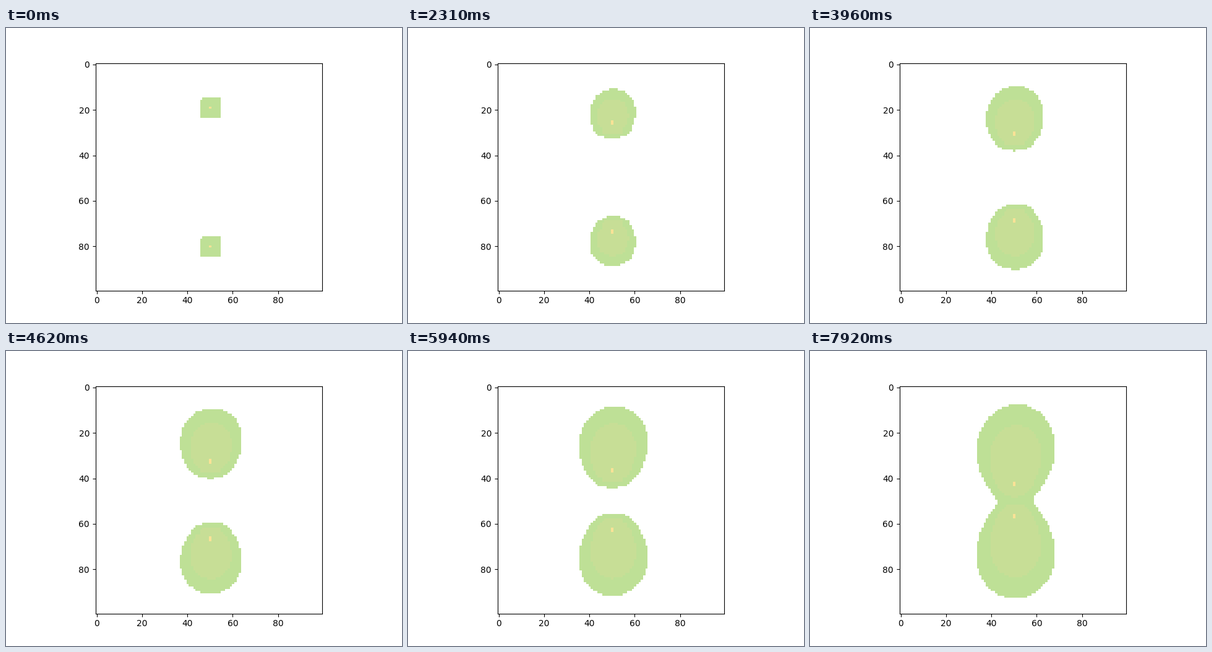
A matplotlib script that plays this animation: 640 px wide and 476 px high, repeating every 8000 ms.

```python
import numpy as np
import matplotlib.pyplot as plt
from matplotlib.animation import FuncAnimation

SIZE = 100
STEPS = 25
STEP_MS = 330
LOOP_MS = 8000
TICK_MS = 40

SPREAD = 0.7                      # share of each cell that diffuses per step
LEVELS = [0.0042, 0.014, 0.132]   # trail strength where the colour changes
PALETTE = np.array([(255, 255, 255), (190, 224, 150),
                    (199, 222, 150), (250, 226, 150)], dtype=np.uint8)

# 9 x 9 neighbourhood without its upper left corner
OFFSETS = [(r, c) for r in range(-4, 5) for c in range(-4, 5)
           if (r, c) != (-4, -4)]


def diffuse(trail):
    mean = sum(np.roll(trail, off, axis=(0, 1)) for off in OFFSETS) / len(OFFSETS)
    return (1 - SPREAD) * trail + SPREAD * mean


def simulate():
    """Two walkers approach each other, leaving a diffusing trail."""
    trail = np.zeros((SIZE, SIZE))
    images = []
    for step in range(STEPS):
        trail[19 + step, 50] += 1
        trail[80 - step, 50] += 1
        trail = diffuse(trail)
        images.append(PALETTE[np.digitize(trail, LEVELS)])
    return images


images = simulate()

fig, ax = plt.subplots(figsize=(6.4, 4.76), dpi=100)
picture = ax.imshow(images[0], interpolation="nearest")


def update(frame):
    now = (frame + 1) * TICK_MS - 1
    picture.set_data(images[min(now // STEP_MS, STEPS - 1)])
    return [picture]


anim = FuncAnimation(fig, update, frames=LOOP_MS // TICK_MS,
                     interval=TICK_MS, repeat=True, repeat_delay=0)
plt.show()
```
